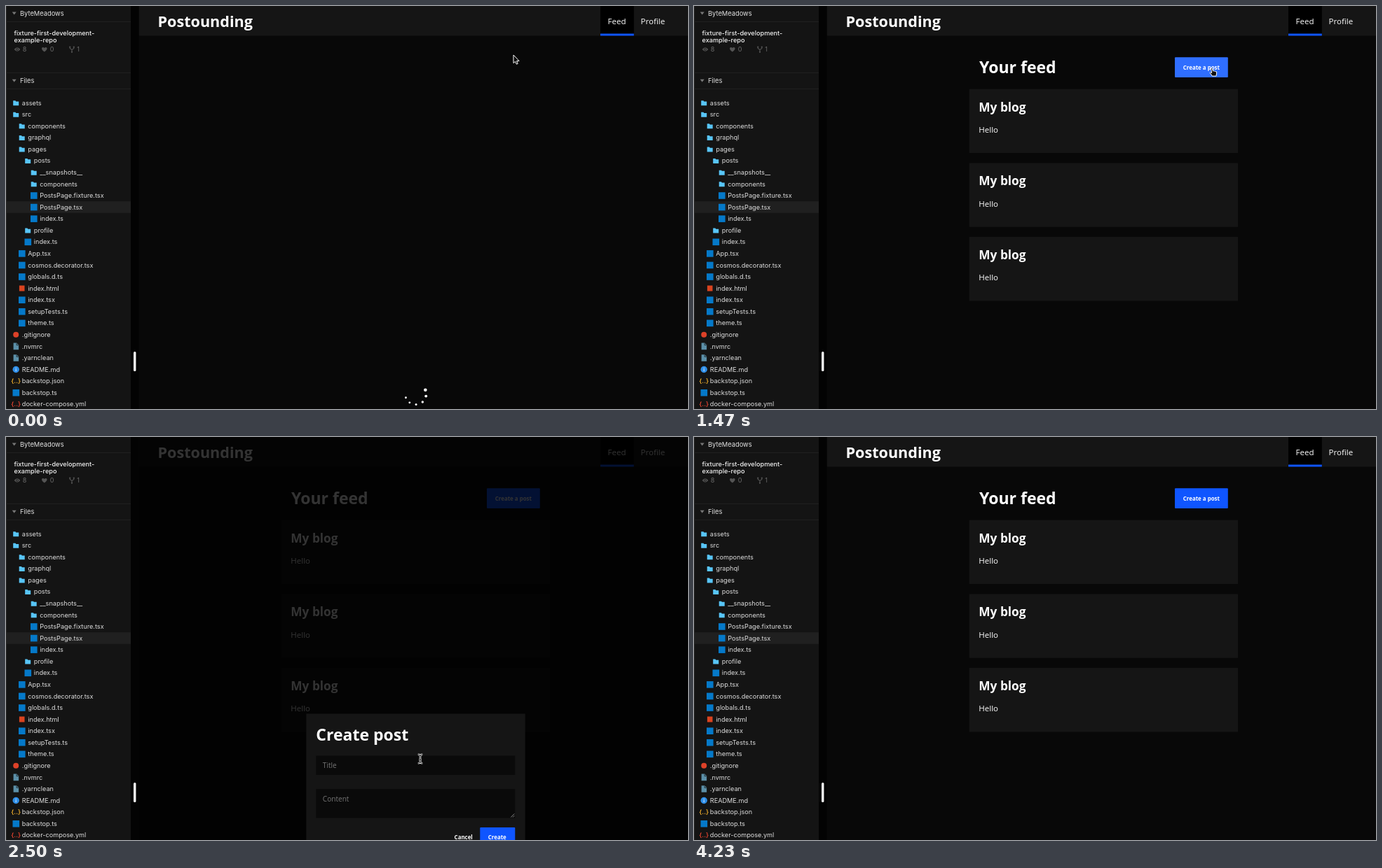
Write an HTML page with a canvas that moves like this. It is 973x576 px and loops after 4330 ms.

```html
<!DOCTYPE html>
<html lang="en">
<head>
<meta charset="utf-8">
<title>Feed demo</title>
<style>
html, body { margin: 0; width: 100%; height: 100%; overflow: hidden; background: #080808; }
canvas { display: block; }
</style>
</head>
<body>
<canvas id="stage" width="973" height="576"></canvas>
<script>
const LOOP = 4330, BLUE = '#0f55ff';
const FEED_AT = 270;
const OPEN = [1810, 2030], CLOSE = [3340, 3540], HOVER = [1170, 1340];
const c = document.getElementById('stage').getContext('2d');

const clamp = v => Math.max(0, Math.min(1, v));
const ramp = (t, [a, b]) => clamp((t - a) / (b - a));
const smooth = k => k * k * (3 - 2 * k);
const mix = (a, b, k) => a + (b - a) * k;

// CSS ease-in-out: cubic-bezier(.42, 0, .58, 1)
function easeInOut(x) {
  let lo = 0, hi = 1;
  for (let i = 0; i < 18; i++) {
    const s = (lo + hi) / 2, r = 1 - s;
    if (1.26 * r * r * s + 1.74 * r * s * s + s * s * s < x) lo = s; else hi = s;
  }
  return smooth(lo);
}

function box(x, y, w, h, fill, r = 0) {
  c.fillStyle = fill;
  c.beginPath();
  c.roundRect(x, y, w, h, r);
  c.fill();
}

function dot(x, y, r, fill) {
  c.fillStyle = fill;
  c.beginPath();
  c.arc(x, y, r, 0, 2 * Math.PI);
  c.fill();
}

function label(s, x, y, font, fill) {
  c.font = font;
  c.fillStyle = fill;
  c.fillText(s, x, y);
}

const sans = (size, weight = 400) => `${weight} ${size}px "Open Sans", sans-serif`;
const ui = (size, weight = 400) => `${weight} ${size}px Inter, sans-serif`;

function shape(d, x, y, fill, stroke, width = 1) {
  c.save();
  c.translate(x, y);
  const p = new Path2D(d);
  if (fill) { c.fillStyle = fill; c.fill(p); }
  if (stroke) { c.strokeStyle = stroke; c.lineWidth = width; c.stroke(p); }
  c.restore();
}

// level, icon kind, name
const files = [
  [0, 'dir', 'assets'], [0, 'dir', 'src'], [1, 'dir', 'components'], [1, 'dir', 'graphql'],
  [1, 'dir', 'pages'], [2, 'dir', 'posts'], [3, 'dir', '__snapshots__'], [3, 'dir', 'components'],
  [3, 'ts', 'PostsPage.fixture.tsx'], [3, 'ts', 'PostsPage.tsx'], [3, 'ts', 'index.ts'],
  [2, 'dir', 'profile'], [2, 'ts', 'index.ts'], [1, 'ts', 'App.tsx'],
  [1, 'ts', 'cosmos.decorator.tsx'], [1, 'ts', 'globals.d.ts'], [1, 'html', 'index.html'],
  [1, 'ts', 'index.tsx'], [1, 'ts', 'setupTests.ts'], [1, 'ts', 'theme.ts'],
  [0, 'git', '.gitignore'], [0, 'file', '.nvmrc'], [0, 'file', '.yarnclean'],
  [0, 'info', 'README.md'], [0, 'json', 'backstop.json'], [0, 'ts', 'backstop.ts'],
  [0, 'yml', 'docker-compose.yml']
];

function braces(x, y, color) {
  c.textAlign = 'center';
  label('{..}', x, y + 3, ui(9, 600), color);
  c.textAlign = 'left';
}

const icons = {
  dir: (x, y) => shape('M-4-3.5H-.8L.2-2.3H4V3.5H-4Z', x, y + .4, '#58c5f8'),
  ts: (x, y) => box(x - 4.7, y - 4.7, 9.6, 9.6, '#0579c9'),
  html: (x, y) => box(x - 3.8, y - 4, 7.6, 8, '#d9431f'),
  git: (x, y) => dot(x, y, 4, '#dd4128'),
  file: (x, y) => {
    shape('M-3.6-4.8H1L3.9-1.9V4.8H-3.6Z', x, y, '#5b8fa8');
    shape('M1-4.3V-1.6H3.6', x, y, null, '#141414', .8);
  },
  info: (x, y) => {
    dot(x, y, 4.7, '#2f8fe8');
    box(x - .5, y - .9, 1, 3.4, '#dcecff');
    box(x - .5, y - 2.6, 1, 1, '#dcecff');
  },
  json: (x, y) => braces(x, y, '#efad2b'),
  yml: (x, y) => braces(x, y, '#e5432f')
};

function section(name, y) {
  shape('M-3-1.8H3L0 2.2Z', 11.7, y, '#777');
  label(name, 20, y + 3.3, ui(9.3), '#e2e2e2');
}

function drawSidebar() {
  box(0, 0, 178, 576, '#141414');
  box(0, 0, 1, 576, '#252525');
  for (const y of [22, 95, 118]) box(0, y, 178, 1, '#202020');
  section('ByteMeadows', 10.3);
  section('Files', 106.5);
  label('fixture-first-development-', 11.5, 41.8, ui(9.15, 500), '#f2f2f2');
  label('example-repo', 11.5, 52, ui(9.15, 500), '#f2f2f2');

  const gray = '#555';
  shape('M-4.3 0Q0-5.4 4.3 0Q0 5.4-4.3 0Z', 16, 62, gray);
  dot(16, 62, 1.8, '#141414');
  dot(16, 62, 1, gray);
  shape('M0 3.4C-7-1.2-2.6-5 0-2C2.6-5 7-1.2 0 3.4Z', 54.8, 62, gray);
  shape('M-2.8-3V-1.6L0 .6 2.8-1.6V-3M0 .6V4', 94, 62, null, gray, 1.1);
  for (const [dx, dy] of [[-2.8, -3.4], [2.8, -3.4], [0, 3.8]]) dot(94 + dx, 62 + dy, 1.1, gray);
  ['8', '0', '1'].forEach((n, i) => label(n, [23.7, 62.8, 101.2][i], 65.3, ui(9), '#6c6c6c'));

  files.forEach(([level, kind, name], i) => {
    const y = 138.3 + i * 16.575, shift = level * 8.5;
    if (name === 'PostsPage.tsx') box(1, y - 8.3, 177, 16.6, '#202020');
    icons[kind](14.2 + shift, y);
    label(name, 22.8 + shift, y + 3.2, ui(9.15), '#dedede');
  });

  box(178, 0, 11.5, 576, '#030303');
  box(182, 494, 3.4, 28, '#fff', 1.5);
}

function drawHeader() {
  box(189.5, 0, 784, 42.5, '#151515');
  label('Postounding', 216.5, 30, sans(21.6, 700), '#fff');
  box(848, 0, 47.8, 42.5, '#000');
  box(848, 39.5, 47.8, 3, BLUE);
  label('Feed', 858.6, 26, sans(11.5), '#fff');
  label('Profile', 905.6, 26, sans(11.5), '#fff');
}

function drawFeed(hover) {
  label('Your feed', 407, 96.2, sans(23, 700), '#fff');
  const tone = [[15, 47], [85, 110], [255, 255]].map(([a, b]) => Math.round(mix(a, b, hover)));
  box(686, 73.3, 75.8, 28.7, `rgb(${tone})`, 1);
  label('Create a post', 697.8, 90.8, sans(7.9, 700), '#fff');
  for (let i = 0; i < 3; i++) {
    const y = 118.7 + i * 105.7;
    box(392.7, y, 383.3, 91.3, '#151515');
    label('My blog', 406.3, y + 32, sans(17.28, 700), '#fff');
    label('Hello', 406.3, y + 62.1, sans(11.5), '#fff');
  }
}

// Six dots chase each other while the whole ring turns
function drawSpinner(t) {
  for (let i = 0; i < 6; i++) {
    const p = (.525 - .05 * i + t / 2000) % 1;
    const turn = easeInOut(clamp(p / .8)) * 360;
    const scale = mix(1, .4, easeInOut(1 - Math.abs(2 * p - 1)));
    const a = (turn + t / 2500 * 360 + 23 - 135) * Math.PI / 180;
    dot(584.5 + 15 * Math.cos(a), 554.6 + 15 * Math.sin(a), 3.55 * scale, '#fff');
  }
}

function drawModal(k) {
  c.globalAlpha = k;
  box(189.5, 0, 784, 576, 'rgba(0,0,0,.8)');
  box(428.3, 395.6, 312.4, 190, '#151515');
  label('Create post', 442.3, 434.2, sans(23, 700), '#fff');
  box(442.3, 455.4, 284, 27.6, '#0a0a0a');
  label('Title', 451.8, 472.8, sans(10.08), '#757575');
  box(442.3, 503.2, 284, 41.3, '#0a0a0a');
  label('Content', 451.8, 520.8, sans(10.08), '#757575');
  shape('M-5 0L0-5M-2.2 0L0-2.2', 725.3, 543.5, null, '#aaa', .8);
  label('Cancel', 639.6, 575, sans(7.9, 700), '#fff');
  box(676.3, 558, 50, 28, BLUE, 1);
  label('Create', 687.8, 575, sans(7.9, 700), '#fff');
  c.globalAlpha = 1;
}

// time, x, y
const path = [
  [0, 724, 70], [100, 724, 70], [530, 580, 172], [700, 580, 172], [1150, 748, 93],
  [1200, 748, 93], [1550, 737, 88.5], [2190, 737, 88.5], [2490, 591, 460], [2690, 591, 460],
  [3080, 851, 373], [3270, 840.5, 368], [3380, 840.5, 368], [3650, 990, 345], [LOOP, 990, 345]
];

function pointer(t) {
  const i = Math.max(1, path.findIndex(p => p[0] > t));
  const a = path[i - 1], b = path[i];
  const k = smooth(ramp(t, [a[0], b[0]]));
  return [mix(a[1], b[1], k), mix(a[2], b[2], k)];
}

function drawPointer(t) {
  const [x, y] = pointer(t);
  const open = t > OPEN[0] - 40 && t < CLOSE[0];
  const inside = (l, top, r, b) => x > l && x < r && y > top && y < b;
  if (open && inside(442, 455, 726, 483)) {
    const beam = 'M-3.2-6.3Q0-6.3 0-4Q0-6.3 3.2-6.3M0-4V4M-3.2 6.3Q0 6.3 0 4Q0 6.3 3.2 6.3M-1.8 1.2H1.8';
    shape(beam, x, y, null, '#fff', 2.6);
    shape(beam, x, y, null, '#111', 1);
  } else if (!open && t > FEED_AT && inside(686, 73, 762, 102)) {
    shape('M-1 0Q.2-1 1 .2L2 4Q3 3 4 4.2Q5 3.4 5.8 4.8Q7.2 4.2 7.3 6L6.6 11H.8Q0 9-2.4 6.6Q-2.2 5 .2 6.4Z',
      x, y, '#111', '#fff', 1);
  } else {
    shape('M0 0V11.6L2.6 9.3 4.3 13.2 6.2 12.4 4.6 8.6H8.1Z', x, y, '#0a0a0a', '#fff', 1);
  }
}

function draw(t) {
  box(0, 0, 973, 576, '#080808');
  drawHeader();
  const modal = smooth(ramp(t, OPEN)) * (1 - smooth(ramp(t, CLOSE)));
  const hover = ramp(t, HOVER) * (1 - ramp(t, OPEN));
  if (t < FEED_AT) drawSpinner(t); else drawFeed(hover);
  if (modal > 0) drawModal(modal);
  drawPointer(t);
  drawSidebar();
}

const start = performance.now();
function tick() {
  draw((performance.now() - start) % LOOP);
  requestAnimationFrame(tick);
}
tick();
</script>
</body>
</html>
```
